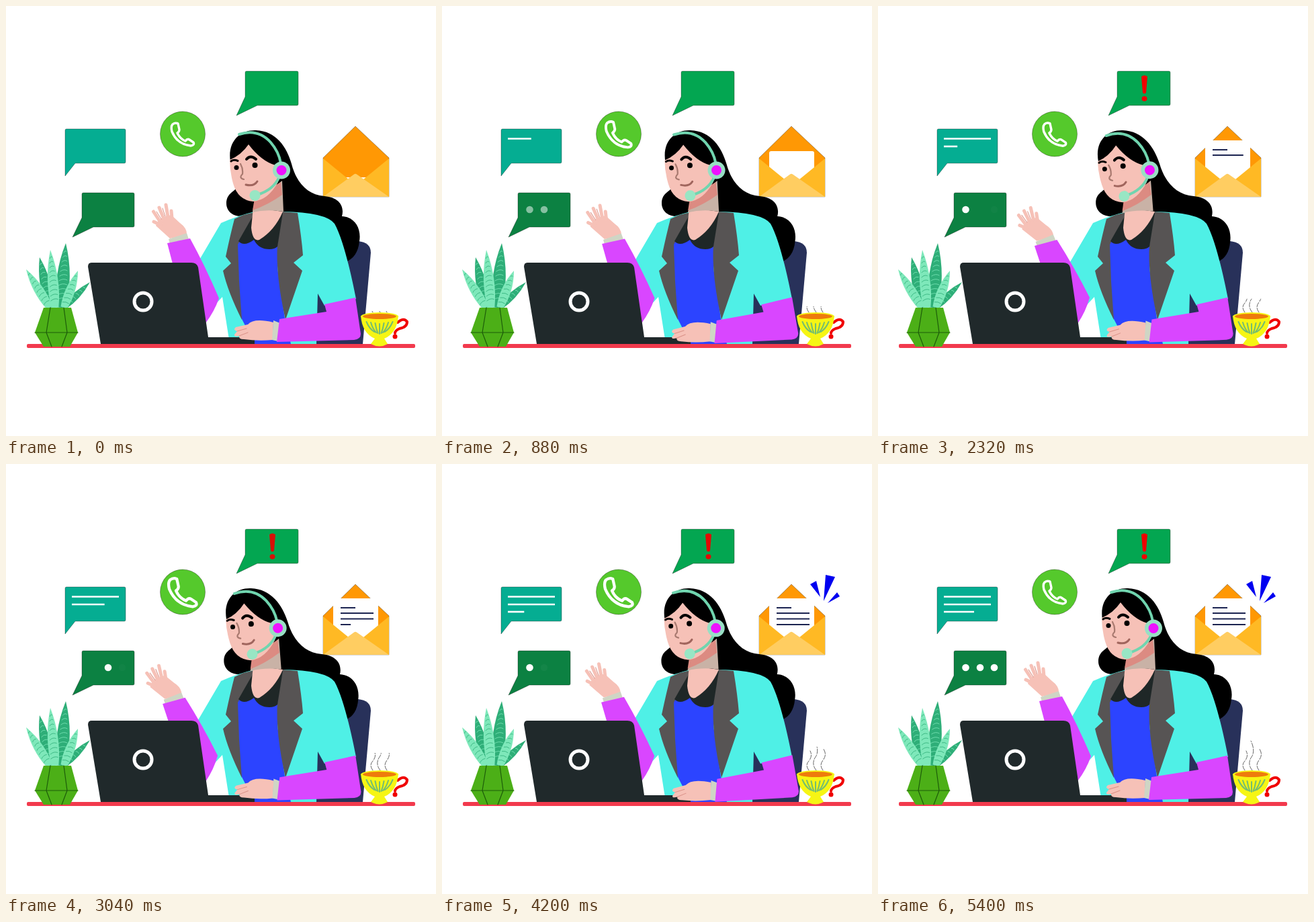
An HTML page that plays this animation: 640x640 px, repeating every 5.44 s.

```html
<!DOCTYPE html>
<html lang="en">
<head>
<meta charset="utf-8">
<title>Customer support</title>
<style>
html, body { margin: 0; width: 100%; height: 100%; overflow: hidden; background: #fff; }
svg { display: block; width: 100vw; height: 100vh; }
.line { fill: none; stroke-linecap: round; stroke-linejoin: round; }
.edge { stroke: #0006; stroke-width: .8; }
.skin { fill: #f6c1b7; }
.purple { fill: #d946ff; }
.cuff { fill: #cfd5c5; }
.lapel { fill: #575454; }
</style>
</head>
<body>
<svg viewBox="0 0 640 640">
  <defs>
    <clipPath id="pocket"><path d="M472 150H570V284H472Z"/></clipPath>
    <clipPath id="steamClip"><rect id="steamBox" x="530" width="60" height="60"/></clipPath>
  </defs>

  <!-- speech bubbles -->
  <g class="edge">
    <path fill="#05ad92" d="M90 183H176Q178 183 178 185V232Q178 234 176 234H103L88 253V185Q88 183 90 183Z"/>
    <path fill="#0c8142" d="M115 278H189Q191 278 191 280V327Q191 329 189 329H130L99 344L113 315V280Q113 278 115 278Z"/>
    <path fill="#03a651" d="M358 97H433Q435 97 435 99V146Q435 148 433 148H374L343 163L356 135V99Q356 97 358 97Z"/>
  </g>
  <g id="message" stroke="#fff" stroke-width="2.6"></g>
  <g id="dots" fill="#fff"></g>
  <g id="alert" fill="#f00000">
    <path d="M392 105Q396.500 101.500 401 105L399 129Q396.500 132 394 129Z"/>
    <ellipse cx="396.500" cy="138" rx="4" ry="3.700"/>
  </g>

  <!-- phone -->
  <circle class="edge" cx="263" cy="190.500" r="33.500" fill="#55c92c"/>
  <path id="phone" class="line" stroke="#fff" stroke-width="3.400" d="M248 176Q252 173 256 175L258 184Q258 187 255 189Q259 198 267 201Q270 197 273 199L279 203Q281 207 275 208Q255 206 247 187Q245 179 248 176Z"/>

  <!-- envelope -->
  <path class="edge" fill="#ff9804" d="M472 226L520 179L570 226V284H472Z"/>
  <g clip-path="url(#pocket)">
    <rect id="paper" x="487" width="67" height="66" rx="3" fill="#fff"/>
    <g id="letter" stroke="#1b2350" stroke-width="2"></g>
    <path fill="#ffb924" d="M472 227L521 267L570 227V284H472Z"/>
    <path fill="#ffcd61" d="M472 284L518 250.500Q520 249 522 250.500L570 284Z"/>
  </g>
  <path id="burst" fill="#0000f0" d="M548 179L557 174L563 198ZM571 165L585 168L568 204ZM588 191L592 197L574 207Z"/>

  <!-- chair and hair -->
  <path fill="#28315a" d="M460 350H524Q543 352 543 367L531 503H460Z"/>
  <path id="hair" d="M334 232C329 200 350 184 372 185C402 186 418 210 425 235C432 262 448 281 474 283C496 285 504 298 500 313C520 314 529 332 526 350C524 370 514 378 505 381L470 330L350 313C335 313 328 303 328 294C328 280 338 277 342 272Z"/>

  <!-- body -->
  <path fill="#4ff0e6" d="M320 323Q345 312 370 306H412Q476 307 489 324C502 347 514 400 521 436L474 446L464 428L462 503H333L322 433L306 450L283 386Z"/>
  <path fill="#2c44ff" d="M343 345H406L404 390L415 465L424 503H370L349 462Z"/>
  <path class="lapel" d="M371 307L345 355L347 410L351 467Q330 425 323 394L335 383L327 373Q334 340 340 317Q355 309 371 307ZM411 306L434 308Q440 345 442 371L428 382L441 394L416 467Q401 400 404 355Z"/>
  <path fill="#1f2727" d="M370 308L346 350Q354 359 369 348Q376 362 392 362Q400 362 404 358L412 308Z"/>
  <path class="skin" d="M368 300L365 330Q367 351 377 348Q400 334 412 306Z"/>

  <g id="head">
    <path fill="#c9b2a6" d="M367 305L380 285L411 260L413 306Q388 302 367 307Z"/>
    <path fill="#dc8b82" d="M367 304L370 286L409 262L411 281Q390 296 367 304Z"/>
    <path class="skin" d="M333 229Q350 222 361 206Q380 231 401 237L405 262Q390 289 368 291Q345 289 338 264Q333 246 333 229Z"/>
    <path class="line" stroke="#000" stroke-width="3" d="M335 231Q339 228 345 230.500"/>
    <path class="line" stroke="#000" stroke-width="4" d="M358 228Q364 221 372 228"/>
    <circle cx="343" cy="240.500" r="3.500"/>
    <circle cx="370.500" cy="237" r="4"/>
    <path class="line" stroke="#a8796f" stroke-width="2.200" d="M349 235Q353 242 352 250Q346 256 354 258"/>
    <path class="line" stroke="#a0655d" stroke-width="3" d="M357 266Q369 269 374 261"/>
    <path class="line" stroke="#70d5af" stroke-width="4" d="M347 191Q375 182 394 203Q406 217 409 234M407 254Q398 274 374 281"/>
    <circle cx="410" cy="244.500" r="13" fill="#98dfc4"/>
    <circle cx="410" cy="244.500" r="7.500" fill="#ee12ff"/>
    <circle cx="370.500" cy="282" r="8" fill="#98e6c4"/>
  </g>

  <!-- waving arm -->
  <g id="wave">
    <path class="skin" d="M244 346L223 327Q227 314 246 311L259 323Q270 331 269 341Z"/>
    <path class="line" stroke="#f6c1b7" stroke-width="5" d="M230 322L219.500 306M235 317L228 300M241 314L238 296M247 316L246 305M230 326L220 321"/>
    <path class="line" stroke="#d99187" stroke-width="1" d="M224 306L231 317M233 301L237 313"/>
    <path class="cuff" d="M242 347L269 338L272 347L244 354Z"/>
    <path class="purple" d="M240 353L274 346Q297 388 317 435Q310 455 297 472L268 460Z"/>
  </g>

  <!-- laptop -->
  <path fill="#20292b" d="M127 382H276Q284 382 286 389L301 493H370V503H141L122 388Q122 382 127 382Z"/>
  <circle cx="204" cy="440" r="13" fill="none" stroke="#fff" stroke-width="5"/>

  <!-- typing arm -->
  <g id="typing">
    <path class="skin" d="M398 471Q369 464 360 474L342 478Q337 482 344 484L340 489Q339 493 347 491Q346 496 354 496Q375 499 397 497Z"/>
    <path class="line" stroke="#d99187" stroke-width="1" d="M344 484L358 480M347 491L360 486"/>
    <path class="cuff" d="M398 468L408 472L405 499L396 497Z"/>
    <path class="purple" d="M474 444L520 434L528 488Q528 496 518 497L403 500L407 466L477 455Z"/>
  </g>

  <rect x="31" y="503" width="578" height="6" rx="2" fill="#f23a4d"/>

  <!-- plant -->
  <g id="leaves"></g>
  <path fill="#4caf17" d="M56 449H97L107 486L95 507H56L43 486Z"/>
  <path class="line" stroke="#1d5c0a" stroke-width="1.200" d="M43 486H107M66 449L60 486L68 507M86 449L91 486L83 507"/>

  <!-- cup -->
  <g clip-path="url(#steamClip)">
    <path class="line" stroke="#666" stroke-width="1" stroke-dasharray="7 2" d="M546 456q-6-8 0-14q6-7 2-15M557 456q-8-10-1-20q6-9-1-24M567 456q-6-8 0-15q7-9 0-18"/>
  </g>
  <path class="line" stroke="#f00000" stroke-width="4" d="M583 471Q592 463 597 470Q597 478 586 480Q579 483 579 487"/>
  <circle cx="579" cy="492" r="3.500" fill="#f00000"/>
  <path fill="#f6f514" d="M528 461Q530 487 549 495L543 503Q556 510 568 503L563 495Q582 487 584 461Z"/>
  <g id="fan" class="line" stroke="#74bd70" stroke-width="2"></g>
  <ellipse cx="556" cy="462" rx="28" ry="6" fill="#f6f514"/>
  <ellipse cx="556" cy="462" rx="25" ry="4" fill="#ee7b0c"/>
</svg>
<script>
const LOOP = 5440, STEP = 40;
const $ = id => document.getElementById(id);
const clamp = v => Math.max(0, Math.min(1, v));
const ramp = (t, from, to) => clamp((t - from) / (to - from));
const swell = p => (1 - Math.cos(2 * Math.PI * p)) / 2;

function add(parent, tag, attrs) {
  const el = document.createElementNS('http://www.w3.org/2000/svg', tag);
  for (const k in attrs) el.setAttribute(k, attrs[k]);
  return $(parent).appendChild(el);
}

// Striped leaf from its base to its tip
function leaf(bx, by, tx, ty, w, fill, stripe) {
  const len = Math.hypot(tx - bx, ty - by), ux = (tx - bx) / len, uy = (ty - by) / len;
  const at = (k, s) => `${bx + ux * len * k - uy * s} ${by + uy * len * k + ux * s}`;
  add('leaves', 'path', { fill, d: `M${at(0, -w * .6)}Q${at(.5, -w * 1.4)} ${at(1, 0)}Q${at(.5, w * 1.4)} ${at(0, w * .6)}Z` });
  let d = '';
  for (let k = .12; k < .88; k += 7 / len) {
    const s = w * (.6 + k * .9) * (1 - k);
    d += `M${at(k, -s)}Q${at(k + .05, 0)} ${at(k + .02, s)}`;
  }
  add('leaves', 'path', { d, fill: 'none', stroke: stripe, 'stroke-width': .8 });
}
const mint = '#7ee8ba', jade = '#2eae78';
leaf(86, 449, 125, 411, 6, jade, mint);
leaf(66, 449, 50, 374, 9, jade, mint);
leaf(82, 449, 89, 353, 11, jade, mint);
leaf(65, 449, 30, 392, 8, mint, jade);
leaf(73, 449, 66, 363, 9, mint, jade);
leaf(86, 449, 107, 394, 8, mint, jade);

for (let i = -3; i <= 3; i++)
  add('fan', 'path', { d: `M${556 + i * 6.5} ${473 - Math.abs(i)}Q${556 + i * 5} 481 ${556 + i * 2.5} ${488 - Math.abs(i)}` });

// Lines that write themselves: start x, y, length, start time, end time
const writeLine = (group, [x, y, len, from, to]) =>
  ({ el: add(group, 'path', {}), x, y, len, from, to });
const lines = [
  ...[[98, 197.5, 70, 0, 1770], [98, 209, 70, 1810, 3580], [98, 220, 45, 3590, 4720]].map(l => writeLine('message', l)),
  ...[[498, 214, 22, 1240, 1720], [498, 222, 49, 1760, 2360], [498, 230.5, 49, 2360, 2880], [498, 239, 49, 2880, 3400]].map(l => writeLine('letter', l))
];

const dots = [130.5, 152, 173].map(cx => add('dots', 'circle', { cx, cy: 303, r: 5.3 }));
const lastFade = [[3580, 4180], [4180, 4720], [4200, 5080]];
function dotAlpha(i, t) {
  const peak = 580 + 600 * i;
  const pulse = p => swell(clamp(1 - Math.abs(t - p) / 600) / 2);
  const first = Math.min(pulse(peak), t / 300);
  return Math.max(first, i < 2 || t < 4200 ? pulse(peak + 1800) : 0, ramp(t, ...lastFade[i]));
}

const set = (id, name, value) => $(id).setAttribute(name, value);
const scaleAt = (x, y, s) => `translate(${x} ${y}) scale(${s}) translate(${-x} ${-y})`;

function draw(t) {
  const sway = t < 2600 ? swell(t / 5200) : swell(.5 + (t - 2600) / 5680);
  set('head', 'transform', `rotate(${-2.1 * sway} 400 400)`);
  set('hair', 'transform', `translate(0 400) skewX(${2.1 * sway}) translate(0 -400)`);
  set('wave', 'transform', `rotate(${-3.8 * sway} 300 465)`);
  set('typing', 'transform', `rotate(${-1.8 * swell(t / 2720)} 495 390)`);

  set('phone', 'transform', scaleAt(263, 190.5, 1 + (t < 4800 ? .25 * swell(t / 1200) : 0)));
  for (const l of lines)
    l.el.setAttribute('d', t > l.from ? `M${l.x} ${l.y}h${l.len * ramp(t, l.from, l.to)}` : '');
  dots.forEach((dot, i) => dot.setAttribute('opacity', dotAlpha(i, t)));

  const dip = t < 4720 ? .15 * swell((t - 2320) / 2400) : 0;
  set('alert', 'opacity', ramp(t, 1140, 1800) * (1 - dip));
  set('paper', 'y', 255 - 55 * ramp(t, 0, 1240));
  const beat = t > 3700 && t < 5200 ? .25 * swell((t - 3700) / 500) : 0;
  set('burst', 'transform', scaleAt(566, 208, ramp(t, 3400, 3680) - beat));
  set('steamBox', 'y', 454 - .0079 * t);
}

function tick() {
  draw(Math.floor(performance.now() % LOOP / STEP) * STEP);
  requestAnimationFrame(tick);
}
tick();
</script>
</body>
</html>
```
